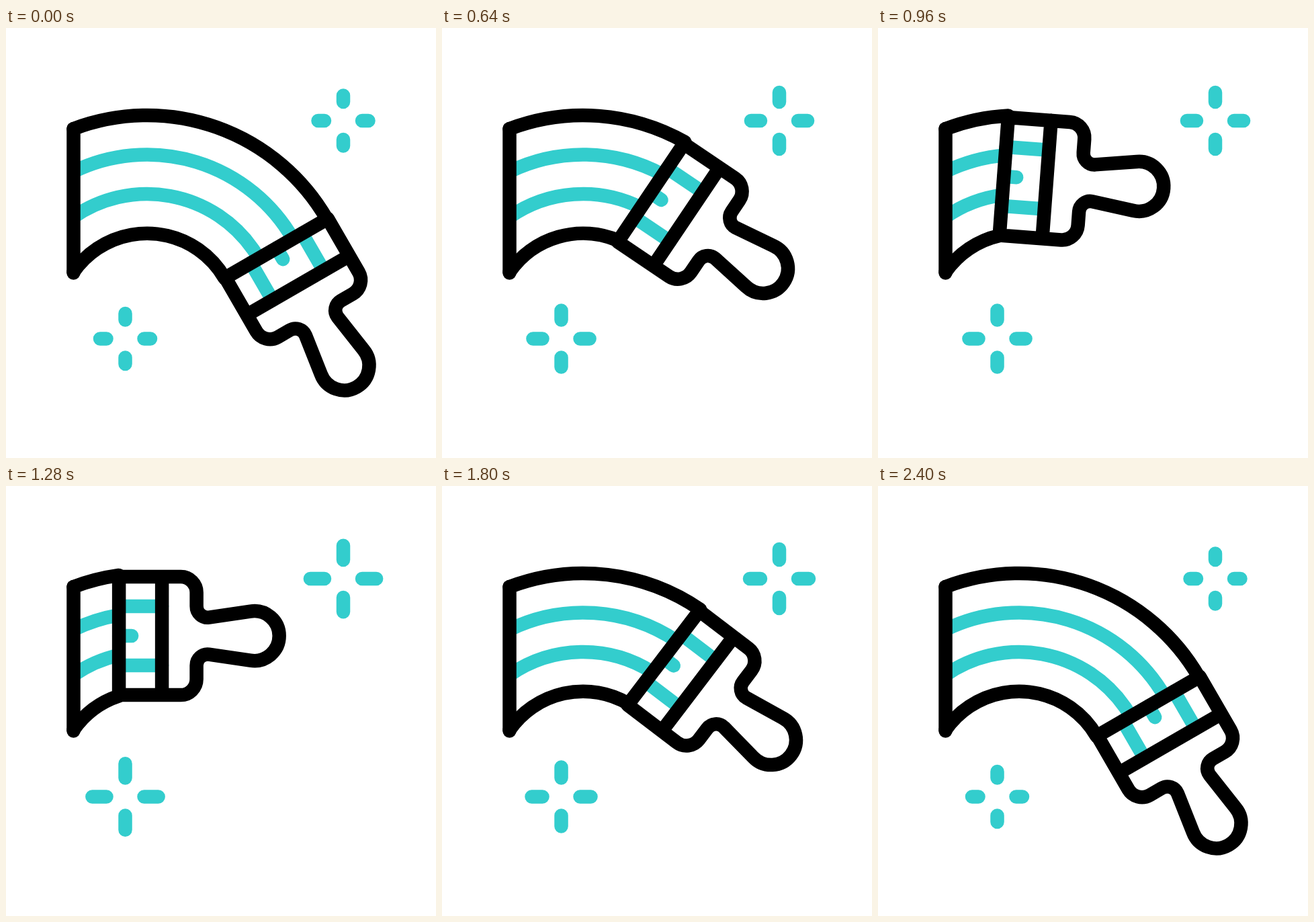
Animation of 640 by 640 pixels, one loop 2440 ms. Source, as an HTML page with a canvas:

```html
<!DOCTYPE html>
<html lang="en">
<head>
<meta charset="utf-8">
<title>Paint brush</title>
<style>
  html, body { margin: 0; width: 100%; height: 100%; overflow: hidden; background: #fff; }
  canvas { display: block; }
</style>
</head>
<body>
<canvas id="stage" width="640" height="640"></canvas>
<script>
const ctx = document.getElementById('stage').getContext('2d');
const LOOP = 2440, STEP = 40;
const TEAL = '#33cdcd', BLACK = '#000';
const CX = 210, CY = 439, LEFT = 100.5;
const RAD = Math.PI / 180;

const brush = new Path2D(`M0-88V88 M64-88V88
  M0-88H92A23.5 23.5 0 0 1 115.5-64.5V-44A16.5 16.5 0 0 0 134-27.5
  L195.5-36.5A37 37 0 1 1 195.5 36.5L134 27.5
  A16.5 16.5 0 0 0 115.5 44V64.5A23.5 23.5 0 0 1 92 88H0`);
const bristles = new Path2D('M0-44H64M0 44H64M0 0H19');

const smooth = q => q * q * (3 - 2 * q);

// Smooth ease whose end is stretched by the amount `drag`
function ease(time, start, length, drag) {
  const x = Math.min(1, Math.max(0, (time - start) / length));
  let q = x;
  for (let i = 0; i < 30; i++) q = x + 3 * drag * (1 - q) * q * q;
  return smooth(q);
}

// Turn and travel: 1 is the far end of the stroke, 0 the near end
function progress(t) {
  const back = t > 1206;
  const time = back ? 2413 - t : t;
  const turn = 1 - ease(time, 304, 842, 0.167);
  const travel = back ? turn : 1 - ease(time, 263, 874, 0.115);
  return { turn, travel };
}

function stroke(color, path) {
  ctx.strokeStyle = color;
  path ? ctx.stroke(path) : ctx.stroke();
}

function sparkle(x, y, reach) {
  ctx.beginPath();
  for (const [dx, dy] of [[1, 0], [-1, 0], [0, 1], [0, -1]]) {
    ctx.moveTo(x + dx * 28, y + dy * 28);
    ctx.lineTo(x + dx * reach, y + dy * reach);
  }
  stroke(TEAL);
}

function draw(t) {
  ctx.fillStyle = '#fff';
  ctx.fillRect(0, 0, 640, 640);
  ctx.lineWidth = 20.5;
  ctx.lineCap = ctx.lineJoin = 'round';

  const phase = t % 800 / 400;
  const reach = 37.5 + 13 * smooth(phase < 1 ? phase : 2 - phase);
  sparkle(502, 138, reach);
  sparkle(177.5, 462.5, reach);

  const { turn, travel } = progress(t);
  const tilt = 60 * turn * RAD;
  const theta = (71 * travel - 11) * RAD;
  const radius = 220 + 2.5 * travel - 12 * travel * (1 - travel);
  const x = CX + radius * Math.sin(theta);
  const y = CY - radius * Math.cos(theta);

  // Arc from the left edge to the point of the brush at the given offset
  function trail(r, offset, color) {
    const end = Math.atan2(y - offset * Math.cos(tilt) - CY, x + offset * Math.sin(tilt) - CX);
    ctx.beginPath();
    ctx.arc(CX, CY, r, -Math.acos((LEFT - CX) / r), end);
    stroke(color);
  }

  ctx.lineCap = 'butt';
  trail(250.5, 29.5, TEAL);
  trail(192, -29.5, TEAL);
  ctx.lineCap = 'round';

  ctx.save();
  ctx.translate(x, y);
  ctx.rotate(tilt);
  stroke(TEAL, bristles);
  ctx.restore();

  trail(309, 88, BLACK);
  trail(133.3, -88, BLACK);
  ctx.beginPath();
  ctx.moveTo(LEFT, 150);
  ctx.lineTo(LEFT, 364.5);
  stroke(BLACK);

  ctx.save();
  ctx.translate(x, y);
  ctx.rotate(tilt);
  stroke(BLACK, brush);
  ctx.restore();
}

function tick() {
  draw(Math.floor(performance.now() % LOOP / STEP) * STEP);
  requestAnimationFrame(tick);
}
tick();
</script>
</body>
</html>
```
